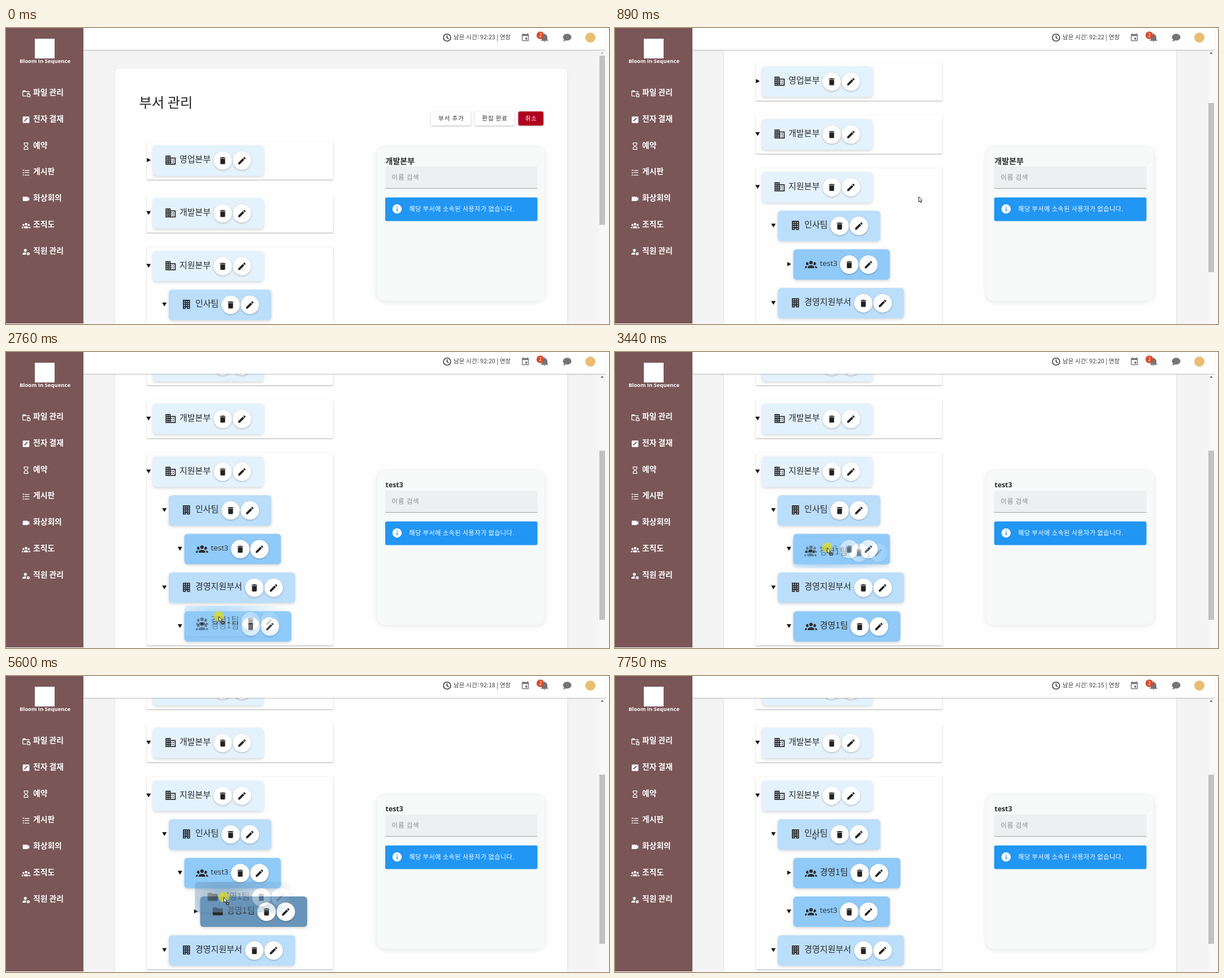
An HTML page with a canvas for the animation above (8000 ms loop, 1067 by 525 pixels).

```html
<!DOCTYPE html>
<html lang="ko">
<head>
<meta charset="utf-8">
<title>부서 관리</title>
<style>
html, body { margin: 0; width: 100%; height: 100%; overflow: hidden; background: #fff; }
canvas { display: block; }
</style>
</head>
<body>
<canvas id="stage" width="1067" height="525"></canvas>
<script>
const W = 1067, H = 525, LOOP = 8000;
const stage = document.getElementById('stage').getContext('2d');
const ghostCanvas = document.createElement('canvas');
ghostCanvas.width = W;
ghostCanvas.height = H;
const ghostLayer = ghostCanvas.getContext('2d');
let ctx = stage;

const KOREAN = '"Noto Sans CJK KR", "Noto Sans CJK JP", "Noto Sans CJK", sans-serif';
const LATIN = '"Open Sans", "Noto Sans", sans-serif';
const INK = '#2c2c2c';

// Icons on a 24 unit grid
const icons = {
  folderFile: 'M4 18h9v2H4a2 2 0 0 1-2-2V6c0-1.1.9-2 2-2h6l2 2h8a2 2 0 0 1 2 2v1h-2V8H4v10M15 11h5l4 4v7h-9V11m2 2v7h5v-4h-3v-3h-2z',
  editBox: 'M19 3H5c-1.1 0-2 .9-2 2v14c0 1.1.9 2 2 2h14c1.1 0 2-.9 2-2V5c0-1.1-.9-2-2-2m-2 5l-8 8H7v-2l8-8 2 2z',
  hourglass: 'M6 2h12v6l-4 4 4 4v6H6v-6l4-4-4-4V2m10 14.5l-4-4-4 4V20h8v-3.5m-4-5l4-4V4H8v3.5l4 4z',
  list: 'M3 4h3v3H3V4m5 1h13v2H8V5m-5 6h3v3H3v-3m5 0h13v2H8v-2m-5 6h3v3H3v-3m5 1h13v2H8v-2z',
  video: 'M17 10.5V7a1 1 0 0 0-1-1H4a1 1 0 0 0-1 1v10a1 1 0 0 0 1 1h12a1 1 0 0 0 1-1v-3.5l4 4v-11l-4 4z',
  people: 'M12 5.5a3.5 3.5 0 0 1 0 7 3.5 3.5 0 0 1 0-7M5 8c.56 0 1.08.15 1.53.42-.15 1.43.27 2.85 1.13 3.96A3 3 0 1 1 5 8m14 0a3 3 0 1 1-2.66 4.38 5.54 5.54 0 0 0 1.13-3.96C17.92 8.15 18.44 8 19 8M5.5 18.25c0-2.07 2.91-3.75 6.5-3.75s6.5 1.68 6.5 3.75V20h-13v-1.75M0 20v-1.5c0-1.39 1.89-2.56 4.45-2.9-.59.68-.95 1.62-.95 2.65V20H0m24 0h-3.5v-1.75c0-1.03-.36-1.97-.95-2.65 2.56.34 4.45 1.51 4.45 2.9V20z',
  personGear: 'M10 4a4 4 0 0 1 0 8 4 4 0 0 1 0-8M10 14c.7 0 1.4.1 2 .2a7 7 0 0 0 .5 5.8H2v-2c0-2.2 3.6-4 8-4M18 13.5a4 4 0 0 1 0 8 4 4 0 0 1 0-8m0 2.5a1.5 1.5 0 0 0 0 3 1.5 1.5 0 0 0 0-3z',
  calendar: 'M17 12h-5v5h5v-5zM16 1v2H8V1H6v2H5a2 2 0 0 0-2 2v14a2 2 0 0 0 2 2h14a2 2 0 0 0 2-2V5a2 2 0 0 0-2-2h-1V1h-2zm3 18H5V8h14v11z',
  bell: 'M21 19v1H3v-1l2-2v-6c0-3.1 2-5.8 5-6.7V4a2 2 0 0 1 4 0v.3c3 .9 5 3.6 5 6.7v6l2 2m-7 2a2 2 0 0 1-4 0z',
  chat: 'M12 3c5.5 0 10 3.6 10 8s-4.5 8-10 8c-1.2 0-2.4-.2-3.5-.5C5.6 21 2 21 2 21c2.3-2.3 2.7-3.9 2.8-4.5C3 15 2 13.1 2 11c0-4.4 4.5-8 10-8z',
  company: 'M12 7V3H2v18h20V7H12zM6 19H4v-2h2v2zm0-4H4v-2h2v2zm0-4H4V9h2v2zm0-4H4V5h2v2zm4 12H8v-2h2v2zm0-4H8v-2h2v2zm0-4H8V9h2v2zm0-4H8V5h2v2zm10 12h-8v-2h2v-2h-2v-2h2v-2h-2V9h8v10zm-2-8h-2v2h2v-2zm0 4h-2v2h2v-2z',
  office: 'M5 3v18h6v-3.5h2V21h6V3H5m2 2h2v2H7V5m4 0h2v2h-2V5m4 0h2v2h-2V5M7 9h2v2H7V9m4 0h2v2h-2V9m4 0h2v2h-2V9m-8 4h2v2H7v-2m4 0h2v2h-2v-2m4 0h2v2h-2v-2m-8 4h2v2H7v-2m8 0h2v2h-2v-2z',
  folder: 'M10 4H4a2 2 0 0 0-2 2v12a2 2 0 0 0 2 2h16a2 2 0 0 0 2-2V8a2 2 0 0 0-2-2h-8l-2-2z',
  trash: 'M19 4h-3.5l-1-1h-5l-1 1H5v2h14V4M6 19a2 2 0 0 0 2 2h8a2 2 0 0 0 2-2V7H6v12z',
  pencil: 'M20.7 7c.4-.4.4-1 0-1.4l-2.3-2.3c-.4-.4-1-.4-1.4 0l-1.9 1.8 3.8 3.8M3 17.25V21h3.75L17.8 9.9l-3.75-3.75L3 17.25z'
};
for (const name in icons) icons[name] = new Path2D(icons[name]);

const levels = [
  { x: 260, color: '#e3f2fd', icon: 'company' },
  { x: 288, color: '#bbdefb', icon: 'office' },
  { x: 315.5, color: '#90caf9', icon: 'people' },
  { x: 343.5, color: '#6994b9', icon: 'folder' }
];
const menu = [['folderFile', '파일 관리'], ['editBox', '전자 결재'], ['hourglass', '예약'],
  ['list', '게시판'], ['video', '화상회의'], ['people', '조직도'], ['personGear', '직원 관리']];

const node = (label, level, width, open) => ({ label, level, width, open });
const hr = node('인사팀', 1, 181.5, true);
const support = node('경영지원부서', 1, 223.5, true);
const rowY = i => 491.2 + 68.6 * i;

// Time, x, y of the pointer tip
const pointer = [
  [70, 537, 299], [700, 537, 299], [770, 540, 299], [890, 537, 299],
  [1120, 537, 299], [1650, 355, 341], [1900, 355, 341], [2410, 376, 478],
  [2640, 376, 478], [3370, 376, 348], [3440, 375, 347], [4220, 375, 347],
  [4430, 351, 362], [4710, 382, 376], [4980, 394, 418], [5380, 393, 418],
  [6160, 351, 285], [6360, 350, 284], [6600, 350, 284], [6760, 350, 279], [LOOP, 350, 279]
];
const presses = [[1820, 1890], [2610, 3700], [5380, 7550]];
const drags = [
  { from: 2650, to: 3700, grab: [376, 478], y: rowY(3), item: node('경영1팀', 2, 189.5, true) },
  { from: 5400, to: 7550, grab: [394, 418], y: rowY(2), item: node('경영1팀', 3, 189.5, false) }
];

const ease = (t, from, to) => {
  const p = Math.min(1, Math.max(0, (t - from) / (to - from)));
  return p * p * (3 - 2 * p);
};
const scrollAt = t => 70 * (ease(t, 70, 360) + ease(t, 330, 680) + ease(t, 1050, 1350));

function pointerAt(t) {
  const i = Math.max(1, pointer.findIndex(k => k[0] > t));
  const [t0, x0, y0] = pointer[i - 1], [t1, x1, y1] = pointer[i];
  const p = ease(t, t0, t1);
  return [x0 + (x1 - x0) * p, y0 + (y1 - y0) * p];
}

function teamRows(t) {
  const test = node('test3', 2, 171, t >= 1890);
  if (t < 3770) return [hr, test, support, drags[0].item];
  if (t < 7620) return [hr, test, drags[1].item, support];
  return [hr, node('경영1팀', 2, 189.5, false), test, support];
}

function rect(x, y, w, h, color, radius = 0, shadow) {
  ctx.save();
  if (shadow) [ctx.shadowColor, ctx.shadowBlur, ctx.shadowOffsetY] = shadow;
  ctx.fillStyle = color;
  ctx.beginPath();
  ctx.roundRect(x, y, w, h, radius);
  ctx.fill();
  ctx.restore();
}

const disc = (x, y, r, color, shadow) => rect(x - r, y - r, 2 * r, 2 * r, color, r, shadow);

function polygon(points, color, outline) {
  ctx.beginPath();
  points.forEach(([x, y]) => ctx.lineTo(x, y));
  ctx.closePath();
  ctx.fillStyle = color;
  ctx.fill();
  if (outline) {
    ctx.strokeStyle = outline;
    ctx.lineWidth = 1;
    ctx.stroke();
  }
}

function text(s, x, y, size, color, { weight = 400, spacing = 0, align = 'left', family = KOREAN } = {}) {
  ctx.font = `${weight} ${size}px ${family}`;
  ctx.letterSpacing = spacing + 'px';
  ctx.textAlign = align;
  ctx.textBaseline = 'middle';
  ctx.fillStyle = color;
  ctx.fillText(s, x, y);
}

function icon(name, x, y, size, color) {
  ctx.save();
  ctx.translate(x - size / 2, y - size / 2);
  ctx.scale(size / 24, size / 24);
  ctx.fillStyle = color;
  ctx.fill(icons[name], 'evenodd');
  ctx.restore();
}

function drawNode({ label, level, width, open }, y, showArrow = true) {
  const { x, color, icon: kind } = levels[level];
  rect(x, y - 27.3, width, 54, color, 6, ['rgba(0,0,0,.16)', 5, 2]);
  icon(kind, x + 31.3, y - 1, 21.6, INK);
  if (label === 'test3') text(label, x + 47, y - 1.5, 13.4, INK, { family: LATIN });
  else text(label, x + 47, y - 2.8, 15, INK, { weight: 350 });
  [['trash', 72, 16.8], ['pencil', 38, 17.5]].forEach(([name, inset, size]) => {
    disc(x + width - inset, y - .2, 16.4, '#fff', ['rgba(0,0,0,.28)', 3, 1]);
    icon(name, x + width - inset, y, size, '#222');
  });
  if (!showArrow) return;
  const ax = x - 7.7, ay = y - 1;
  polygon(open
    ? [[ax - 4, ay - 3.2], [ax + 4, ay - 3.2], [ax, ay + 3.6]]
    : [[ax - 3, ay - 3.7], [ax + 4, ay], [ax - 3, ay + 3.7]], '#111');
}

function drawSidebar() {
  rect(0, 0, 137, 524, '#7a5657');
  rect(51, 19, 35, 35, '#fff');
  text('Bloom In Sequence', 69, 60, 9.5, '#fff', { weight: 700, align: 'center', family: LATIN });
  menu.forEach(([name, label], i) => {
    icon(name, 35.5, 116 + 46.8 * i, 15.5, '#fff');
    text(label, 48, 113.7 + 46.8 * i, 13.8, '#fff', { weight: 600 });
  });
}

function drawHeader(t) {
  rect(137, 0, 924, 38.5, '#fff', 0, ['rgba(0,0,0,.2)', 2, 1]);
  ctx.strokeStyle = '#222';
  ctx.lineWidth = 1.4;
  ctx.beginPath();
  ctx.arc(780.5, 17, 6.4, 0, 7);
  ctx.moveTo(780.5, 13);
  ctx.lineTo(780.5, 17.4);
  ctx.lineTo(783.5, 19.2);
  ctx.stroke();
  const seconds = 23 - Math.max(0, Math.floor((t - 640) / 1005) + 1);
  text(`남은 시간: 92:${seconds} | 연장`, 792, 16.3, 10.7, '#3c3c3c', { weight: 350 });
  icon('calendar', 919, 17, 16.5, '#757575');
  icon('bell', 953, 17, 17, '#757575');
  disc(945.5, 13, 6.8, '#d64a2c');
  text('2', 945.5, 13.5, 9, '#fff', { align: 'center', family: LATIN });
  icon('chat', 993, 17, 18, '#757575');
  disc(1034, 17, 9, '#e9bd72');
}

function drawButton(label, x, width, color, ink) {
  rect(x, 148, width, 25, color, 3, ['rgba(0,0,0,.28)', 3, 1]);
  text(label, x + width / 2 + .5, 160.2, 10.4, ink, { align: 'center', spacing: 1 });
}

function drawPage(t) {
  const scroll = scrollAt(t);
  ctx.save();
  ctx.beginPath();
  ctx.rect(137, 39, 913, 486);
  ctx.clip();
  rect(137, 39, 913, 486, '#f4f4f4');
  ctx.translate(0, -scroll);
  rect(193, 72, 800, 760, '#fefefe', 7, ['rgba(0,0,0,.14)', 3, 1]);
  text('부서 관리', 235.5, 131.5, 24.3, '#212121', { weight: 500 });
  drawButton('부서 추가', 752, 70.5, '#fff', INK);
  drawButton('편집 완료', 829, 71, '#fff', INK);
  drawButton('취소', 906.5, 44.5, '#b00020', '#fff');
  [[201, 68], [295, 68], [388.5, 342]].forEach(([y, h]) =>
    rect(249, y, 330, h, '#fefefe', 3, ['rgba(0,0,0,.32)', 2, 1]));
  drawNode(node('영업본부', 0, 195.5, false), 235.3);
  drawNode(node('개발본부', 0, 195.5, true), 329);
  drawNode(node('지원본부', 0, 195.5, true), 422.7);
  teamRows(t).forEach((row, i) => drawNode(row, rowY(i)));
  ctx.restore();

  rect(1050, 39, 17, 486, '#f8f8f8');
  rect(1050, 49 + .6 * scroll, 10, 300, '#c1c1c1');
  polygon([[1052.5, 45.5], [1057.5, 45.5], [1055, 42.5]], scroll > 0 ? '#505050' : '#a3a3a3');
}

function drawPanel(t) {
  rect(657, 211, 296, 273, '#f8fafa', 14, ['rgba(0,0,0,.11)', 10, 1]);
  if (t < 1890) text('개발본부', 671.5, 235.7, 14, INK, { weight: 600 });
  else text('test3', 671.5, 237, 12.4, INK, { weight: 700, family: LATIN });
  rect(671, 246, 269.5, 38.5, '#eeeff0', [3, 3, 0, 0]);
  rect(671, 284, 269.5, 1, '#a2a2a2');
  text('이름 검색', 682.5, 264.7, 11.5, '#8c8c8c', { spacing: .8 });
  rect(671, 300.5, 269.5, 42, '#2196f3', 3);
  disc(692, 321, 8.2, '#fff');
  rect(691.2, 320, 1.7, 5, '#2196f3');
  rect(691.2, 316.8, 1.7, 1.7, '#2196f3');
  text('해당 부서에 소속된 사용자가 없습니다.', 713.5, 320.7, 11, '#fff', { spacing: .55 });
}

// The dragged copy fades out with distance from the pointer
function drawGhost(drag, x, y, t) {
  ctx = ghostLayer;
  ctx.clearRect(0, 0, W, H);
  ctx.save();
  ctx.translate(x - drag.grab[0], y - drag.grab[1] - scrollAt(t));
  drawNode(drag.item, drag.y, false);
  ctx.restore();
  const fade = ctx.createRadialGradient(x, y, 0, x, y, 125);
  fade.addColorStop(0, 'rgba(0,0,0,.68)');
  fade.addColorStop(1, 'rgba(0,0,0,0)');
  ctx.globalCompositeOperation = 'destination-in';
  ctx.fillStyle = fade;
  ctx.fillRect(0, 0, W, H);
  ctx.globalCompositeOperation = 'source-over';
  ctx = stage;
  ctx.drawImage(ghostCanvas, 0, 0);
}

function drawPointer(t) {
  if (t < 70) return;
  const [x, y] = pointerAt(t);
  const drag = drags.find(d => t >= d.from && t < d.to);
  if (drag) drawGhost(drag, x, y, t);
  if (presses.some(([from, to]) => t >= from && t < to)) disc(x + .5, y, 9.2, 'rgba(222,220,36,.75)');
  ctx.save();
  ctx.translate(x + .5, y + .5);
  polygon([[0, 0], [0, 9], [2, 7.2], [3.5, 10.4], [5, 9.8], [3.6, 6.7], [6, 6.4]], '#fff', '#222');
  if (drag) {
    rect(4.5, 8.5, 5, 5, '#333', 1);
    rect(6, 10, 2, 2, '#ddd');
  }
  ctx.restore();
}

function draw(t) {
  rect(0, 0, W, H, '#fff');
  drawPage(t);
  drawPanel(t);
  drawHeader(t);
  drawSidebar();
  drawPointer(t);
}

let start;
function frame(now) {
  start ??= now;
  draw((now - start) % LOOP);
  requestAnimationFrame(frame);
}
draw(0);
requestAnimationFrame(frame);
</script>
</body>
</html>
```
